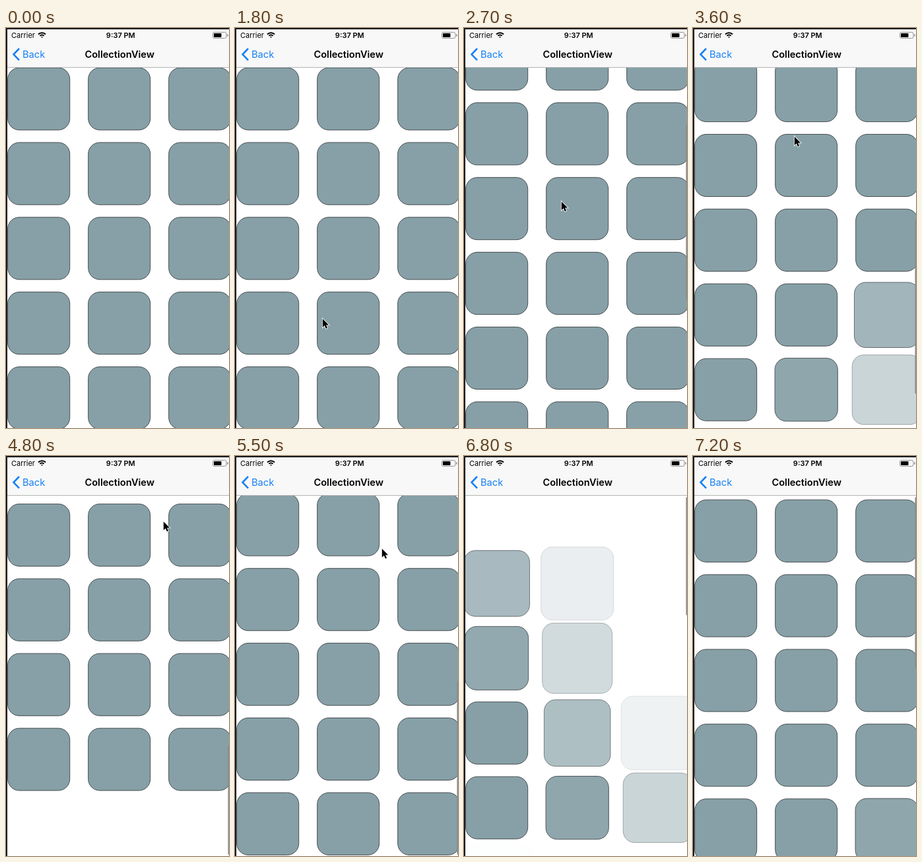
An HTML page with a canvas that plays this animation: 338x604 px, repeating every 7300 ms.

```html
<!DOCTYPE html>
<html lang="en">
<head>
<meta charset="utf-8">
<title>Collection grid</title>
<style>
  html, body { margin: 0; width: 100%; height: 100%; overflow: hidden; background: #fff; }
  canvas { display: block; }
</style>
</head>
<body>
<canvas id="stage" width="338" height="604"></canvas>
<script>
const ctx = document.getElementById('stage').getContext('2d');
const LOOP = 7300, STEP = 100, W = 338, H = 604, NAV = 60;
const ROWS = 10, COLS = 3, CELL = 94, LEFT = 2.7, PITCH_X = 122, PITCH_Y = 112.9;
const FADE = 260, COLUMN_DELAY = 100;
const MAX_SCROLL = 566, TRACK = 540, BAR = 264;

const clamp = x => Math.min(1, Math.max(0, x));
const phase = (t, from, to) => clamp((t - from) / (to - from));
const mix = (a, b, u) => a + (b - a) * u;
const smooth = u => u * u * (3 - 2 * u);
const easeOut = u => u * (2 - u);
// Critically damped return from 1 to 0
const settle = ms => (1 + ms / 108) * Math.exp(-ms / 108);

function scrollAt(t) {
  if (t < 3200) return mix(0, 173, easeOut(phase(t, 1800, 2700)));          // slow drag
  if (t < 4200) return mix(466, 173, Math.exp((3200 - t) / 80));            // flick
  if (t < 4850) return mix(466, 665, smooth(phase(t, 4200, 4800)));         // pull past the end
  if (t < 6313) return mix(MAX_SCROLL, 665, settle(t - 4850));              // bounce
  if (t < 6700) return mix(MAX_SCROLL, -112, phase(t, 6313, 6700) ** 2);    // fling to the top
  return -112 * settle(t - 6700);                                           // bounce
}

// Pointer stops: time, x, y
const stops = [
  [1000, 292, 565], [1400, 132, 438], [1800, 132, 438], [2700, 147, 261], [3300, 153, 163],
  [3600, 153, 163], [4200, 200, 418], [4800, 238, 98], [6200, 206, 180], [6310, 206, 180],
  [6800, 222, 620]
];

function pointerAt(t) {
  const next = stops.findIndex(s => s[0] > t);
  if (next < 1) return null;
  const a = stops[next - 1], b = stops[next], u = smooth(phase(t, a[0], b[0]));
  return [mix(a[1], b[1], u), mix(a[2], b[2], u)];
}

const rowTop = (row, t) => NAV + row * PITCH_Y - scrollAt(t);

// How long a row has been on screen, up to the longest fade
function shownFor(row, t) {
  let age = 0;
  while (age < FADE + COLUMN_DELAY * (COLS - 1)) {
    const y = rowTop(row, t - age);
    if (y >= H || y + CELL <= NAV) break;
    age += 10;
  }
  return age;
}

function box(x, y, w, h, r, fill, stroke) {
  ctx.beginPath();
  ctx.roundRect(x, y, w, h, r);
  if (fill) { ctx.fillStyle = fill; ctx.fill(); }
  if (stroke) { ctx.strokeStyle = stroke; ctx.lineWidth = 0.95; ctx.stroke(); }
}

function drawGrid(t) {
  for (let row = 0; row < ROWS; row++) {
    const age = shownFor(row, t);
    for (let col = 0; col < COLS; col++) {
      const shown = smooth(clamp((age - col * COLUMN_DELAY) / FADE));
      if (!shown) continue;
      const size = CELL * mix(1.21, 1, shown), grow = (size - CELL) / 2;
      ctx.globalAlpha = shown;
      box(LEFT + col * PITCH_X - grow, rowTop(row, t) - grow, size, size, 17.3, '#87a0a7', '#41474a');
    }
  }
  ctx.globalAlpha = 1;
}

function drawScrollbar(t) {
  const s = scrollAt(t), past = Math.max(0, s - MAX_SCROLL);
  const y = 62 + (TRACK - BAR) * clamp(s / MAX_SCROLL) + past;
  const fadeOut = t < 6313 ? 1 - phase(t, 5800, 6100) : 1;
  ctx.globalAlpha = phase(t, 1800, 1900) * fadeOut;
  box(336.5, y, 3, BAR - Math.max(past, -s, 0), 1.5, '#85888b');
  ctx.globalAlpha = 1;
}

function text(str, x, y, font, color = '#000', align = 'left') {
  ctx.font = font + ' Inter, Roboto, sans-serif';
  ctx.fillStyle = color;
  ctx.textAlign = align;
  ctx.fillText(str, x, y);
}

function drawBars() {
  ctx.fillStyle = '#f8f8f8';
  ctx.fillRect(0, 0, W, NAV - 1);
  ctx.fillStyle = '#b4b6b7';
  ctx.fillRect(0, NAV - 1, W, 1);

  text('Carrier', 8, 15, '11px');
  text('9:37 PM', 173.8, 15, '600 11px', '#000', 'center');
  text('CollectionView', 172.2, 45, '600 14.6px', '#000', 'center');
  text('Back', 25, 45, '14.7px', '#1780f5');

  // Signal arcs
  ctx.strokeStyle = '#000';
  ctx.lineWidth = 2;
  for (const r of [1, 4.4, 7.8]) {
    ctx.beginPath();
    ctx.arc(54.5, 15, r, -Math.PI * 0.75, -Math.PI * 0.25);
    ctx.stroke();
  }

  // Battery
  box(313.5, 6.5, 20.5, 9, 2.5, null, '#8e8e8e');
  box(315, 8, 11.5, 6, 1, '#000');
  box(335.2, 9.2, 1.5, 3.6, 0.8, '#8e8e8e');

  // Back chevron
  ctx.strokeStyle = '#1780f5';
  ctx.lineWidth = 2.6;
  ctx.stroke(new Path2D('M20 31 L11.5 39.8 L20 48.6'));

  // Device edge
  ctx.fillStyle = '#1b191c';
  ctx.fillRect(0, 0, W, 2);
  ctx.fillRect(0, 0, 2, H);
}

const arrow = new Path2D('M0 0V16L3.7 12.6L6.2 18.2L8.8 17.1L6.4 11.6H11.4Z');

function drawPointer(t) {
  const at = pointerAt(t);
  if (!at) return;
  ctx.save();
  ctx.translate(at[0] + 0.8, at[1] + 1);
  ctx.scale(0.82, 0.82);
  ctx.strokeStyle = '#fff';
  ctx.lineWidth = 2;
  ctx.stroke(arrow);
  ctx.fillStyle = '#000';
  ctx.fill(arrow);
  ctx.restore();
}

function draw(t) {
  ctx.fillStyle = '#fff';
  ctx.fillRect(0, 0, W, H);
  drawGrid(t);
  drawScrollbar(t);
  drawBars();
  drawPointer(t);
}

const start = performance.now();
function tick() {
  const t = (performance.now() - start) % LOOP;
  draw(Math.floor(t / STEP) * STEP);
  requestAnimationFrame(tick);
}
tick();
</script>
</body>
</html>
```
